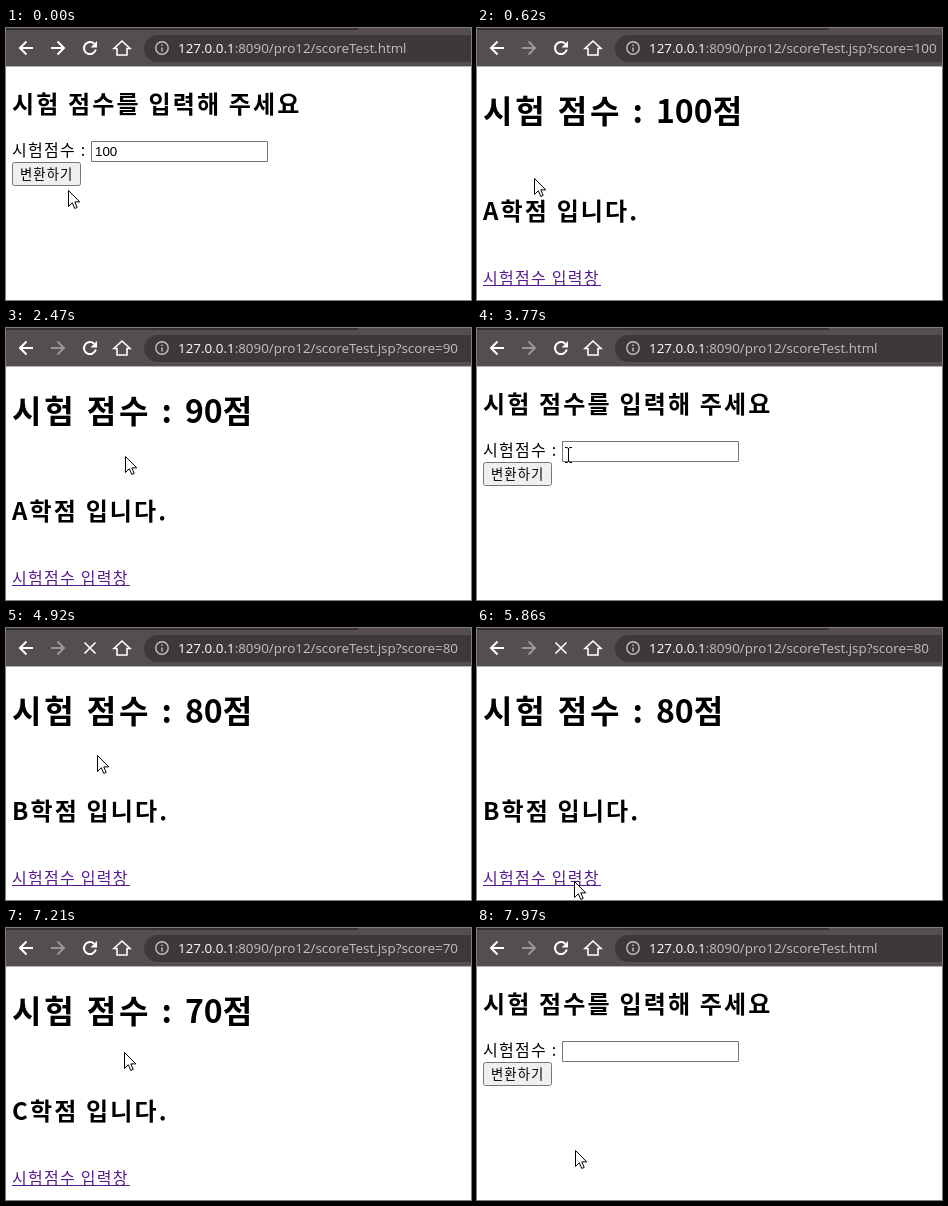
Recreate the animation shown at these times as an HTML page with a canvas. Size 465 px wide and 272 px high, loop 8 s.

```html
<!DOCTYPE html>
<html lang="ko">
<head>
<meta charset="utf-8">
<title>Score form</title>
<style>
html, body { margin: 0; width: 465px; height: 272px; overflow: hidden; background: #fff; }
canvas { display: block; }
</style>
</head>
<body>
<canvas id="stage" width="465" height="272"></canvas>
<script>
const ctx = document.getElementById('stage').getContext('2d');
const LOOP = 8000, TICK = 70, BLINK = 530, FIRST_SUBMIT = 410;
const KOREAN = '"Noto Sans CJK KR", "Noto Sans CJK", sans-serif';
const UI = '"Open Sans", "Noto Sans", sans-serif';

// [start, submitted score or null for the form, page is loading]
const scenes = [
  [0, null, false], [340, null, true], [FIRST_SUBMIT, 100, true], [480, 100, false],
  [1300, 100, true], [1370, null, false],
  [2400, 90, true], [2470, 90, false], [3160, 90, true], [3230, null, false],
  [4920, 80, true], [4990, 80, false], [5860, 80, true], [5930, null, false],
  [7160, 70, true], [7210, 70, false], [7770, 70, true], [7840, null, false]
];

// [time, field content, focused (default true)]
const keys = [
  [0, '100', false], [1370, '', false], [1930, ''], [2130, '9'], [2200, '90'],
  [3230, '', false], [3840, ''], [4650, '8'], [4720, '80'],
  [5930, '', false], [6270, ''], [6680, '7'], [6810, '70'], [7840, '', false]
];

const pointerPath = [
  [0, 62, 162], [280, 57, 150], [810, 57, 150], [1160, 73, 248], [1230, 73, 248],
  [1300, 73, 258], [1650, 100, 146], [1860, 119, 128], [2660, 119, 128],
  [2940, 70, 244], [3160, 70, 244], [3360, 53, 182], [3430, 58, 150],
  [3560, 58, 150], [3770, 91, 127], [5450, 91, 127], [5730, 97, 244],
  [5790, 97, 244], [5860, 97, 253], [6200, 110, 124], [6410, 118, 124],
  [7290, 118, 124], [7570, 98, 242], [7840, 98, 242], [7970, 98, 222]
];

const field = { x: 85, y: 113, w: 177, h: 21 };
const button = { x: 6, y: 134, w: 69, h: 24 };
const link = { x: 6, y: 241, w: 118, h: 17 };

const latest = (list, t) => list.findLast(item => item[0] <= t);
const inside = (p, r) => p.x >= r.x && p.x < r.x + r.w && p.y >= r.y && p.y < r.y + r.h;

function pointerAt(t) {
  const from = latest(pointerPath, t);
  const to = pointerPath[pointerPath.indexOf(from) + 1] || from;
  const span = to[0] - from[0] || 1;
  const k = Math.floor((t - from[0]) / TICK) * TICK / span;
  const mix = i => Math.round(from[i] + (to[i] - from[i]) * k);
  return { x: mix(1), y: mix(2) };
}

function rect(color, x, y, w, h) {
  ctx.fillStyle = color;
  ctx.fillRect(x, y, w, h);
}

function text(str, x, y, font, color) {
  ctx.font = font;
  ctx.fillStyle = color;
  ctx.fillText(str, x, y);
  return x + ctx.measureText(str).width;
}

// Hangul is set on a full em, digits keep their own width
function korean(str, x, y, size, weight = 350, color = '#000') {
  const spacing = size * (weight === 700 ? 0.09 : 0.08);
  for (const run of str.split(/(\d+)/)) {
    ctx.letterSpacing = /\d/.test(run) ? '0px' : spacing + 'px';
    x = text(run, x, y, `${weight} ${size}px ${KOREAN}`, color);
  }
  ctx.letterSpacing = '0px';
}

function box({ x, y, w, h }, radius, fill, stroke) {
  ctx.beginPath();
  ctx.roundRect(x + 0.5, y + 0.5, w - 1, h - 1, radius);
  ctx.fillStyle = fill;
  ctx.fill();
  ctx.lineWidth = 1;
  ctx.strokeStyle = stroke;
  ctx.stroke();
}

function lines(d, x, y, color = '#fff', width = 2) {
  ctx.save();
  ctx.translate(x, y);
  ctx.strokeStyle = color;
  ctx.lineWidth = width;
  ctx.stroke(new Path2D(d));
  ctx.restore();
}

function shape(d, x, y, fill, stroke) {
  ctx.save();
  ctx.translate(x, y);
  const path = new Path2D(d);
  ctx.fillStyle = fill;
  ctx.fill(path);
  if (stroke) {
    ctx.lineWidth = 1;
    ctx.strokeStyle = stroke;
    ctx.stroke(path);
  }
  ctx.restore();
}

function drawToolbar(score, busy, canGoForward) {
  rect('#544e4e', 0, 0, 465, 39);
  rect('#353131', 0, 0, 352, 2);
  rect('#b6b4b4', 0, 38, 465, 1);
  lines('M7 0H-6M0.5 -6.5L-6 0L0.5 6.5', 20, 20);
  lines('M-7 0H6M-0.5 -6.5L6 0L-0.5 6.5', 52, 20, canGoForward ? '#fff' : '#9b9696');
  if (busy) {
    lines('M-5.5 -5.5L5.5 5.5M5.5 -5.5L-5.5 5.5', 84, 20, '#fff', 1.6);
  } else {
    lines('M4.2 -4.2A6 6 0 1 0 5.8 1.6', 84, 20);
    shape('M7 -7V-0.6H0.6Z', 84, 20, '#fff');
  }
  lines('M-8 0.5H-5V7H5V0.5H8L0 -7Z', 116, 20, '#fff', 1.6);

  ctx.beginPath();
  ctx.roundRect(138, 7, 360, 27, 13.5);
  ctx.fillStyle = '#3d393b';
  ctx.fill();
  lines('M6.2 0A6.2 6.2 0 1 1 -6.2 0A6.2 6.2 0 1 1 6.2 0M0 -3.6V-2M0 -0.6V3.6', 156, 20, '#c4c0c0', 1.4);
  const font = '13.4px ' + UI;
  const page = score === null ? 'scoreTest.html' : 'scoreTest.jsp?score=' + score;
  const end = text('127.0.0.1', 172, 25, font, '#fff');
  text(':8090/pro12/' + page, end, 25, font, '#c2bfc2');
}

function drawForm(t, pointer) {
  const [since, value, focused = true] = latest(keys, t);
  korean('시험 점수를 입력해 주세요', 6, 85, 24, 700);
  korean('시험점수 :', 6, 128, 16);
  box(field, 0, '#fff', focused ? '#2a2a2a' : '#767676');
  const end = text(value, 89, 128, '13.333px "Liberation Sans", Arial, sans-serif', '#000');
  if (focused && (t - since) % (2 * BLINK) < BLINK) rect('#000', Math.round(end), 116, 1, 15);
  const hover = inside(pointer, button);
  box(button, 2, hover ? '#e5e5e5' : '#efefef', hover ? '#4f4f4f' : '#767676');
  korean('변환하기', 14, 151, 13.333);
}

function drawResult(score) {
  const grade = score >= 90 ? 'A' : score >= 80 ? 'B' : 'C';
  korean(`시험 점수 : ${score}점`, 6, 95, 32, 700);
  korean(grade + '학점 입니다.', 6, 192, 24, 700);
  korean('시험점수 입력창', 6, 256, 16, 350, '#551a8b');
  rect('#551a8b', link.x, 257, link.w, 1);
}

function drawPointer(p, score, busy) {
  if (score === null && inside(p, field)) {
    lines('M-3 -7.5H-1L0.5 -6.5L2 -7.5H4M0.5 -6.5V6.5M-3 7.5H-1L0.5 6.5L2 7.5H4', p.x, p.y, '#000', 1);
  } else if (score !== null && !busy && inside(p, link)) {
    shape('M-1.5 12V1.5Q0 -0.5 1.5 1.5V7Q3 5.5 4.5 7.5Q6 6.5 7.5 8.5Q9 7.5 10.5 9.5V15L8.5 18V21H-1.5V18L-5.5 12Q-5.5 9.5 -3.5 10.5Z',
      p.x, p.y, '#fff', '#000');
  } else {
    shape('M0.5 0.5V16.5L4.3 12.8L6.8 18.5L9.2 17.4L6.8 11.9H11.8Z', p.x, p.y, '#fff', '#000');
  }
}

function draw(t) {
  const [, score, busy] = latest(scenes, t);
  const pointer = pointerAt(t);
  rect('#fff', 0, 0, 465, 272);
  drawToolbar(score, busy, t < FIRST_SUBMIT);
  if (score === null) drawForm(t, pointer);
  else drawResult(score);
  drawPointer(pointer, score, busy);
}

const start = performance.now();
function frame() {
  draw((performance.now() - start) % LOOP);
  requestAnimationFrame(frame);
}
frame();
</script>
</body>
</html>
```
